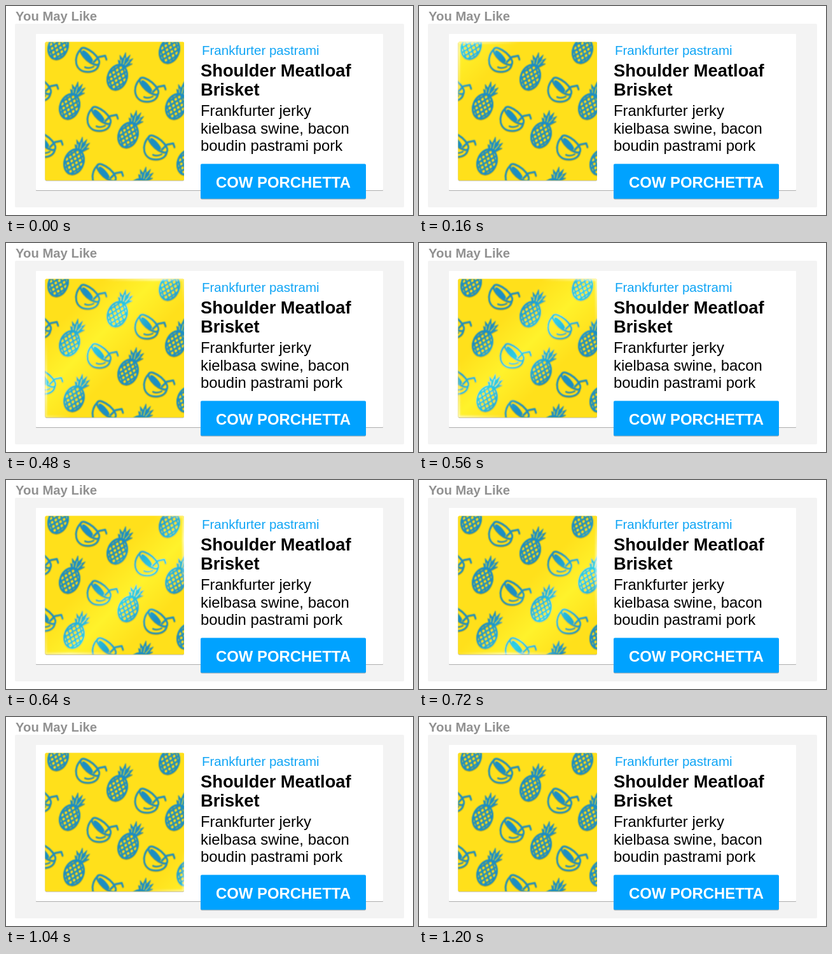
These frames come from a looping animation (640x329 px, 1.5 s). An HTML page:

```html
<!DOCTYPE html>
<html lang="en">
<head>
<meta charset="utf-8">
<title>You May Like</title>
<style>
  html, body { margin: 0; width: 100%; height: 100%; overflow: hidden; background: #fff; }
  svg { display: block; width: 640px; height: 329px; }
  text { font-family: "Liberation Sans", Helvetica, Arial, sans-serif; }
  .bold { font-weight: bold; }
  .card { filter: drop-shadow(0 1px .7px rgba(0, 0, 0, .28)); }
  .fruit { filter: drop-shadow(.6px 1px .3px rgba(95, 105, 60, .55)); }
  .photo { isolation: isolate; }
  .glow { mix-blend-mode: overlay; opacity: .6; }
  .edge { filter: blur(1.5px); opacity: .75; }
</style>
</head>
<body>
<svg viewBox="0 0 640 329">
  <defs>
    <clipPath id="photo"><rect width="218.5" height="218" rx="2"/></clipPath>
    <clipPath id="body"><ellipse rx="15" ry="20"/></clipPath>
    <linearGradient id="shine" gradientUnits="userSpaceOnUse" x1="-42" y1="-42" x2="42" y2="42">
      <stop stop-color="#fff" stop-opacity="0"/>
      <stop offset=".5" stop-color="#fff"/>
      <stop offset="1" stop-color="#fff" stop-opacity="0"/>
    </linearGradient>
    <g id="pineapple" transform="rotate(20)" fill="#1c8fc4" stroke="#1c8fc4">
      <path id="mesh" clip-path="url(#body)" stroke-width="2.3" fill="none"/>
      <ellipse rx="14.8" ry="20" fill="none" stroke-width="2.8"/>
      <path d="M-4-19L-8-26L-4-25L-8-34L-2-30L-1-41L3-32L7-40L7-30L13-36L10-26L15-28L7-19Z" stroke-width=".6"/>
      <path d="M-2-22L-4-28M2-22L1-33M5-22L9-31" stroke="#ffe01b" stroke-width="1.1" fill="none"/>
    </g>
    <g id="coconut" fill="none" stroke="#1c8fc4" stroke-width="2.6" stroke-linecap="round" stroke-linejoin="round">
      <ellipse rx="18.5" ry="7.5" transform="translate(-2 -6) rotate(41)"/>
      <path d="M-15.5-18C-29-6-27 18.5-5 18.5C4 18.5 11 14 12 6"/>
      <ellipse rx="11" ry="3" transform="translate(-6 -6) rotate(48)" fill="#1c8fc4" stroke-width="1.5"/>
      <path d="M-10 11Q-3 14 4 10" stroke-width="2"/>
      <path d="M4 3L12-5L22-7L24-1"/>
    </g>
  </defs>

  <rect x="14" y="28" width="612" height="289" rx="2" fill="#f3f3f3"/>
  <rect class="card" x="47" y="44" width="546" height="246" rx="1" fill="#fff"/>

  <rect class="card" x="61.5" y="56.5" width="218.5" height="218" rx="2" fill="#ffe01b"/>
  <g class="photo" transform="translate(61.5 56.5)" clip-path="url(#photo)">
    <rect width="219" height="219" fill="#ffe01b"/>
    <g class="fruit" id="fruits" transform="translate(-61.5 -56.5)"></g>
    <rect class="glow" width="219" height="219" fill="url(#shine)"/>
    <rect class="edge" width="218.5" height="218" fill="none" stroke="url(#shine)" stroke-width="5"/>
  </g>

  <text class="bold" x="15" y="23" font-size="20.3" fill="#919191">You May Like</text>
  <text x="308" y="77" font-size="20.5" fill="#10a5f5">Frankfurter pastrami</text>
  <g class="bold" font-size="27.3">
    <text x="306" y="111">Shoulder Meatloaf</text>
    <text x="306" y="141">Brisket</text>
  </g>
  <g font-size="23.9">
    <text x="306" y="173">Frankfurter jerky</text>
    <text x="306" y="201">kielbasa swine, bacon</text>
    <text x="306" y="228">boudin pastrami pork</text>
  </g>
  <rect class="card" x="306" y="248.5" width="260" height="55" rx="2" fill="#00a2ff"/>
  <text class="bold" x="330" y="286" font-size="23.9" fill="#fff">COW PORCHETTA</text>
</svg>
<script>
  const $ = id => document.getElementById(id);

  let mesh = '';
  for (let x = -48; x <= 48; x += 8) mesh += `M${x - 18}-24L${x + 18} 24M${x + 18}-24L${x - 18} 24`;
  $('mesh').setAttribute('d', mesh);

  const place = (id, spots) => spots.map(([x, y]) => `<use href="#${id}" x="${x}" y="${y}"/>`).join('');
  $('fruits').innerHTML =
    place('pineapple', [[100, 158], [175, 112], [192, 203], [107, 245], [257, 70], [267, 158], [82, 64], [207, 292], [285, 246]]) +
    place('coconut', [[134, 85], [227, 132], [152, 178], [241, 223], [160, 268], [58, 131], [65, 219]]);

  const LOOP = 1500, STEP = 80, LAST = 1200;

  function draw(now) {
    const t = Math.floor(Math.min(now % LOOP, LAST) / STEP) * STEP;
    const pos = (t / 2 - 65) / 2;
    $('shine').setAttribute('gradientTransform', `translate(${pos} ${pos})`);
    requestAnimationFrame(draw);
  }
  draw(performance.now());
</script>
</body>
</html>
```
